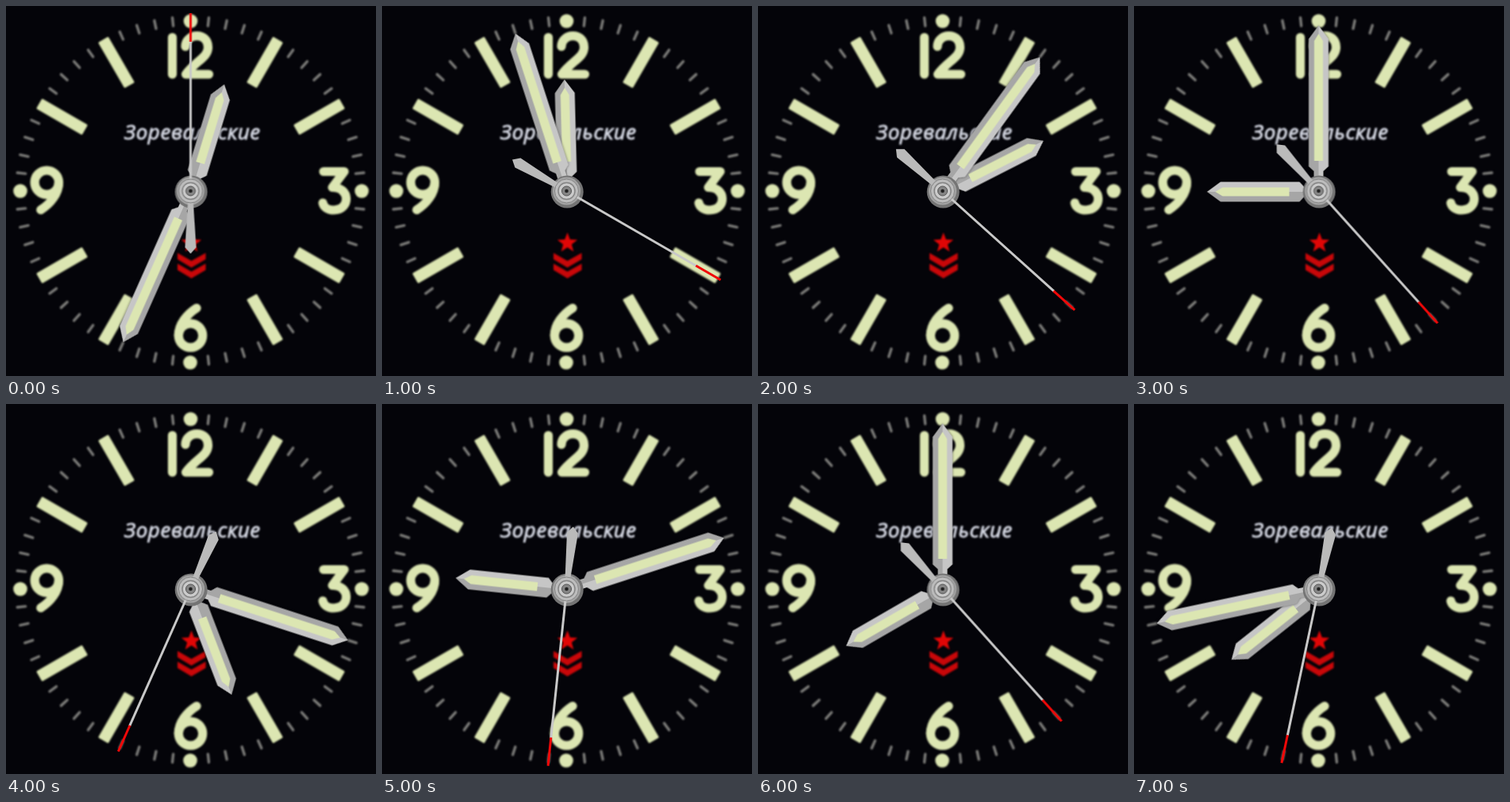
An HTML page that plays this animation: 466 px wide and 466 px high, repeating every 8 s.

```html
<!DOCTYPE html>
<html lang="ru">
<head>
<meta charset="utf-8">
<title>Watch dial</title>
<style>
  html, body { margin: 0; width: 100%; height: 100%; overflow: hidden; background: #040409; }
  svg { display: block; width: 100vw; height: 100vh; }
  #dial { filter: blur(.8px); }
  .lume { fill: #dce6b2; }
  .digits { fill: none; stroke: #dce6b2; stroke-width: 11.2; stroke-linecap: round; stroke-linejoin: round; }
  .tick { stroke: #7c7c79; stroke-width: 3.4; stroke-linecap: round; }
  .name { font: italic 500 26px "Open Sans", "Noto Sans", sans-serif; fill: #d6d9e4; stroke: #d6d9e4; stroke-width: .9; letter-spacing: .6px; }
  .hand { filter: drop-shadow(0 0 1.5px #0008); }
  .dark { fill: #a6a6a6; }
  .light { fill: #c6c6c6; }
</style>
</head>
<body>
<svg viewBox="0 0 466 466">
  <g id="dial">
    <g id="marks" transform="translate(232.5 233)"></g>
    <g class="lume">
      <circle cx="232.5" cy="19" r="8.8"/>
      <circle cx="448" cy="233" r="8.8"/>
      <circle cx="232" cy="449" r="8.8"/>
      <circle cx="18" cy="233" r="8.8"/>
    </g>
    <g class="digits">
      <path d="M209.5 39.5V86"/>
      <path d="M226 51C226 34 254.5 32 254.5 52C254.5 65 239 69 226.5 86H255.5"/>
      <path d="M400 208.5H426L411 228.5C434 228 434 257 413 257C405 257 400 253 399 248"/>
      <g id="six">
        <circle cx="232.5" cy="415" r="15.2"/>
        <path d="M240 380.5C228 388 217.3 401 217.3 415"/>
      </g>
      <use href="#six" transform="rotate(180 141.9 318.6)"/>
    </g>
    <text class="name" x="235" y="167.5" text-anchor="middle">Зоревальские</text>
    <path id="star" fill="#e00606"/>
    <g fill="#c80709">
      <path id="chevron" d="M216 311L233.5 321L251.5 311V319L233.5 329.5L216 319Z"/>
      <use href="#chevron" y="13.5"/>
    </g>
  </g>

  <g transform="translate(232.5 233)">
    <g transform="translate(1 1)"><g id="hour" class="hand"></g></g>
    <g id="minute" class="hand"></g>
    <circle r="20.5" cx=".7" cy="1" fill="#747474"/>
    <circle r="17.5" fill="#a3a3a3"/>
    <g id="second">
      <path d="M-3 8L-7 71L0 79L7 71L3 8Z" fill="#bababa"/>
      <path d="M0 0V-189" stroke="#c8c8c8" stroke-width="3"/>
      <path d="M0 -188V-224" stroke="#f00808" stroke-width="3"/>
    </g>
    <circle r="15" fill="#bdbdbd" stroke="#878787"/>
    <circle r="10.5" fill="#cbcbcb" stroke="#858585" stroke-width="1.5"/>
    <circle r="6" fill="#858585" stroke="#555"/>
    <circle r="2.3" fill="#222"/>
  </g>
</svg>
<script>
const $ = id => document.getElementById(id);

// Hour bars and minute ticks
let marks = '';
for (let i = 0; i < 60; i++) {
  if (i % 15 === 0) continue;
  const turn = `transform="rotate(${i * 6})"`;
  marks += i % 5
    ? `<path class="tick" d="M0 -209V-219.5" ${turn}/>`
    : `<rect class="lume" x="-7.4" y="-220.3" width="14.8" height="66.6" rx="1.5" ${turn}/>`;
}
$('marks').innerHTML = marks;

// Five-pointed star
const points = Array.from({ length: 10 }, (_, i) => {
  const r = i % 2 ? 5.6 : 13.3, a = i * Math.PI / 5;
  return `${233.5 + r * Math.sin(a)} ${298.5 - r * Math.cos(a)}`;
});
$('star').setAttribute('d', `M${points.join('L')}Z`);

// Sword hand: two shaded halves and a luminous strip
function sword(tip, base, lumeTip, lumeBase) {
  const half = (shade, side) =>
    `<path class="${shade}" d="M0 0V${-tip}L${12.5 * side} ${17 - tip}V${-base - 6}L${6 * side} ${-base}V0Z"/>`;
  return half('light', 1) + half('dark', -1) +
    `<path class="lume" d="M0 ${-lumeTip}L5.5 ${9 - lumeTip}V${-lumeBase}H-5.5V${9 - lumeTip}Z"/>`;
}
$('hour').innerHTML = sword(141.5, 19, 131, 38);
$('minute').innerHTML = sword(208.5, 25, 198, 38);

// One time of day per second: hours, minutes, seconds
const times = [
  [12, 34, 0], [11, 57, 20], [2, 6, 22], [9, 0, 23],
  [5, 18, 34], [9, 12, 31], [8, 0, 23], [7, 43, 32]
];
const turn = (id, deg) => $(id).setAttribute('transform', `rotate(${deg})`);
const start = performance.now();
let shown = -1;

function draw() {
  const step = Math.floor((performance.now() - start) / 1000) % times.length;
  if (step !== shown) {
    shown = step;
    const [h, m, s] = times[step];
    turn('hour', h * 30 + m / 2);
    turn('minute', m * 6);
    turn('second', s * 6);
  }
  requestAnimationFrame(draw);
}
draw();
</script>
</body>
</html>
```
